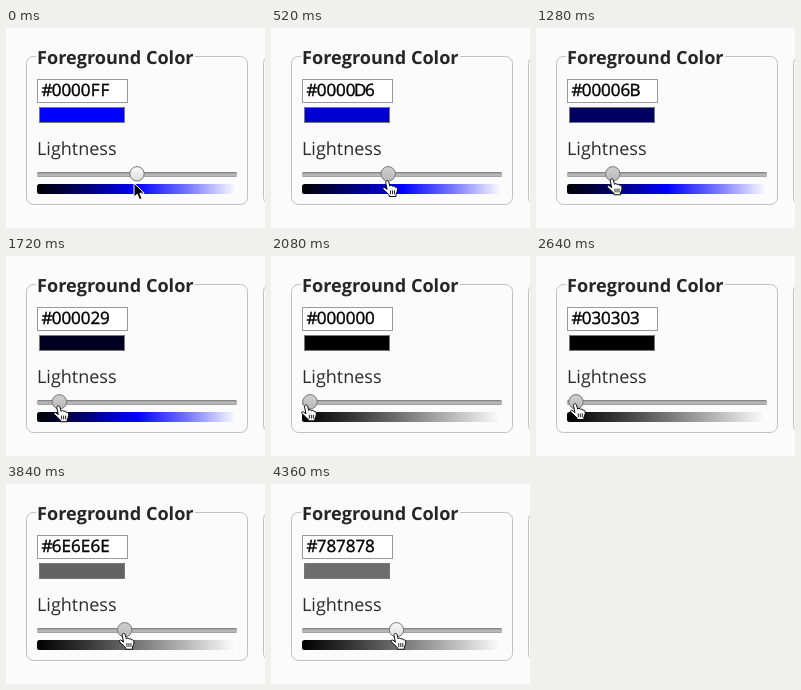
An HTML page that plays this animation: 259x200 px, repeating every 4480 ms.

```html
<!DOCTYPE html>
<html lang="en">
<head>
<meta charset="utf-8">
<title>Lightness slider</title>
<style>
html, body { margin: 0; width: 100%; height: 100%; overflow: hidden; background: #fbfbfb; }
svg { display: block; width: 259px; height: 200px; font: 18px "Open Sans", sans-serif; text-rendering: geometricPrecision; }
</style>
</head>
<body>
<svg viewBox="0 0 259 200">
  <defs>
    <linearGradient id="ramp">
      <stop/><stop offset=".25"/><stop offset=".5"/><stop offset=".75"/><stop offset="1"/>
    </linearGradient>
    <linearGradient id="groove" x2="0" y2="1">
      <stop offset=".1" stop-color="#858585"/>
      <stop offset=".4" stop-color="#b6b6b6"/>
      <stop offset=".7" stop-color="#b6b6b6"/>
      <stop offset="1" stop-color="#999"/>
    </linearGradient>
    <linearGradient id="idle" x2="0" y2="1">
      <stop stop-color="#fafafa"/><stop offset="1" stop-color="#dcdcdc"/>
    </linearGradient>
    <linearGradient id="pressed" x2="0" y2="1">
      <stop stop-color="#d0d0d0"/><stop offset="1" stop-color="#b8b8b8"/>
    </linearGradient>
  </defs>
  <g fill="none" stroke="#c0c0c0">
    <rect x="20.5" y="28.5" width="221" height="148" rx="7"/>
    <rect x="257.5" y="28.5" width="221" height="148" rx="7"/>
  </g>
  <path d="M30 26h159v5H30z" fill="#fbfbfb"/>
  <text x="31" y="36" font-size="18.1" font-weight="700" fill="#262626">Foreground Color</text>
  <rect x="31.5" y="51.5" width="90" height="23" fill="#fff" stroke="#999"/>
  <text id="hex" y="68" font-size="17" text-anchor="middle" stroke="#000" stroke-width=".4"></text>
  <rect id="swatch" x="33.5" y="79.5" width="85" height="15" stroke="#777"/>
  <text x="31" y="127" fill="#2a2a2a">Lightness</text>
  <rect x="31" y="144" width="200" height="5" rx="1.5" fill="url(#groove)"/>
  <rect x="31" y="156" width="200" height="10" rx="2.5" fill="url(#ramp)"/>
  <circle id="thumb" cy="145.8" r="7.2" stroke="#777"/>
  <path id="arrow" d="M0 0V14.2L3.2 11.2L5.5 16.6L8.1 15.5L5.8 10.2H10.2Z" fill="#000" stroke="#fff"/>
  <g id="hand" stroke="#000" stroke-linejoin="round" stroke-linecap="round">
    <g transform="translate(-1 -1) scale(.96)">
      <path fill="#fff" d="M-1.6 1.6C-2 -.4 1 -.8 1.6 1.2L2.8 5.6C3.2 4.4 5.4 4.4 5.8 6C6.4 5 8.2 5.4 8.4 6.8C9.2 6.2 10.6 6.8 10.6 8.4C10.8 11 10 12.6 9.2 14V16.4H2.2V14.8C.6 13.4 -1.6 11 -4.4 8.6C-5.2 7.4 -3.8 6.2 -2.4 7.2L-.4 8.8Z"/>
      <path fill="none" stroke-width=".9" d="M3.4 10.4v3.2M5.5 10.4v3.2M7.6 10.4v3.2"/>
    </g>
  </g>
</svg>
<script>
const LOOP = 4480, STEP = 40;
const HAND = 120, PRESS = 260, BLACK = 1990, RETURN = 2540, STOP = 4110, RELEASE = 4360;
const [hex, swatch, thumb, arrow, hand] =
  ["hex", "swatch", "thumb", "arrow", "hand"].map(id => document.getElementById(id));
const stops = document.querySelectorAll("#ramp stop");

// progress from 0 to 1 between two times
const span = (t, from, to) => Math.min(1, Math.max(0, (t - from) / (to - from)));
const smooth = s => s * s * (3 - 2 * s);

// screen colour for a lightness of 0 to 1, slightly darker than its value
function shade(l, grey) {
  const [base, blue] = (grey ? [l, l] : [Math.max(0, 2 * l - 1), Math.min(1, 2 * l)])
    .map(c => Math.round(255 * c ** 1.12));
  return `rgb(${base},${base},${blue})`;
}

hex.setAttribute("x", Array.from({ length: 7 }, (_, i) => 41 + i * 9.65).join(" "));

function draw(t) {
  const grey = t >= BLACK;
  const v = grey ? 47 * smooth(span(t, RETURN, STOP)) : 50 * (1 - span(t, PRESS, BLACK));
  const percent = Math.round(v);
  const pair = Math.round(percent * (grey ? 2.55 : 5.1)).toString(16).toUpperCase().padStart(2, "0");
  hex.textContent = "#" + (grey ? pair.repeat(3) : "0000" + pair);
  swatch.setAttribute("fill", shade(percent / 100, grey));
  stops.forEach((stop, i) => stop.setAttribute("stop-color", shade(i / 4, grey)));

  const x = 39 + 1.84 * v;
  thumb.setAttribute("cx", x);
  thumb.setAttribute("fill", t >= PRESS && t < RELEASE ? "url(#pressed)" : "url(#idle)");

  // the pointer drifts up, dips again near the end and overshoots the left end
  const px = x - 3 * (1 - span(t, 0, PRESS)) - 6 * Math.sin(Math.PI * span(t, BLACK, RETURN));
  const py = 155 - 7.5 * span(t, 0, 3200) + 3 * span(t, 3300, 3800);
  for (const el of [arrow, hand]) {
    el.setAttribute("transform", `translate(${px} ${py})`);
    el.setAttribute("display", (el === hand) === (t >= HAND) ? "inline" : "none");
  }
}

const start = performance.now();
function tick(now) {
  const t = Math.max(0, now - start) % LOOP;
  draw(Math.floor(t / STEP) * STEP);
  requestAnimationFrame(tick);
}
draw(0);
requestAnimationFrame(tick);
</script>
</body>
</html>
```
